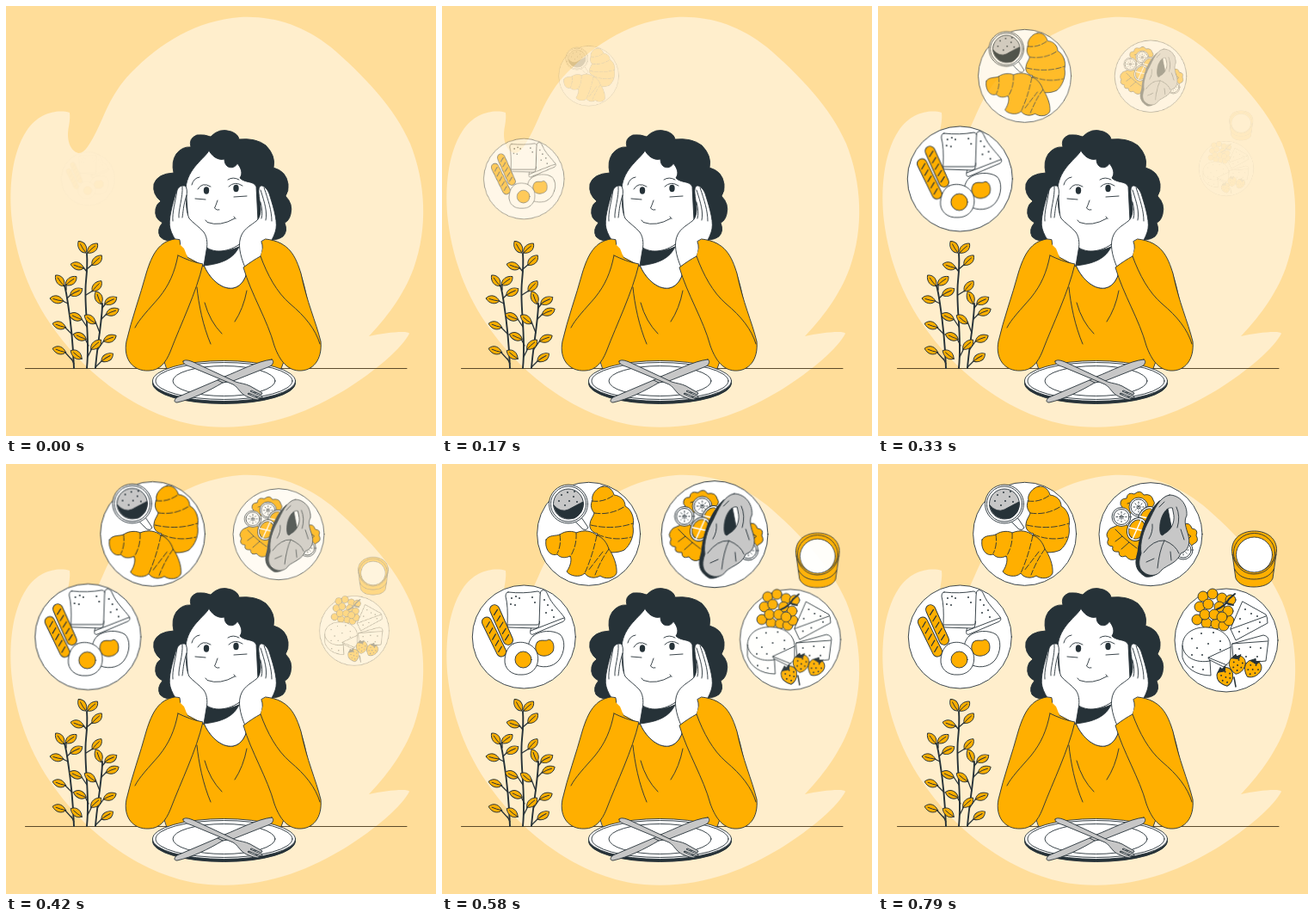
Animation of 500 by 500 pixels, one loop 0.83 s. Source, as an HTML page:

```html
<!DOCTYPE html>
<html lang="en">
<head>
<meta charset="utf-8">
<title>Thinking about food</title>
<style>
html, body { margin: 0; width: 100%; height: 100%; overflow: hidden; background: #ffdd99; }
svg { display: block; width: 100vw; height: 100vh; }
svg { stroke: #263238; stroke-width: .9; stroke-linecap: round; stroke-linejoin: round; fill: none; }
.o { fill: #ffaf00; }
.w { fill: #fff; }
.g { fill: #c7c7c7; }
.d { fill: #263238; }
.flat { stroke: none; }
.dash { stroke-dasharray: 7 2.5; }
.dot { stroke-width: 1.9; }

/* each dish pops in over 500 ms with a slight overshoot */
.dish { animation: 830ms cubic-bezier(.36, -.01, .5, 1.38) infinite; }
#breakfast { transform-origin: 95.3px 201px; animation-name: pop1; animation-timing-function: cubic-bezier(.335, .15, .499, 1.361); }
#bakery { transform-origin: 170.6px 81.3px; animation-name: pop2; }
#fish { transform-origin: 317px 81.7px; animation-name: pop3; }
#cheese { transform-origin: 405px 171px; animation-name: pop4; }
@keyframes pop1 {
  0% { opacity: .015; transform: scale(.5075); }
  56.15%, 100% { opacity: 1; transform: none; }
}
@keyframes pop2 {
  0%, 7.83% { opacity: 0; transform: scale(.5); }
  68.07%, 100% { opacity: 1; transform: scale(1); }
}
@keyframes pop3 {
  0%, 19.88% { opacity: 0; transform: scale(.5); }
  80.12%, 100% { opacity: 1; transform: scale(1); }
}
@keyframes pop4 {
  0%, 31.93% { opacity: 0; transform: scale(.5); }
  92.17%, 100% { opacity: 1; transform: scale(1); }
}
</style>
</head>
<body>
<svg viewBox="0 0 500 500">
  <defs>
    <g id="leaf">
      <path class="o" d="M-8,0C-5,-6 3,-6 8,-1C4,6 -4,5 -8,0Z"/>
      <path d="M-8,0Q-2,-1 4,-.6"/>
    </g>
    <circle id="grape" class="o" r="6"/>
    <g id="cucumber">
      <circle class="w" r="11"/>
      <circle r="9"/>
      <path stroke-dasharray="1.6 2" d="M-6,0H6M0,-6V6M-4,-4L4,4M4,-4L-4,4"/>
    </g>
    <g id="berry">
      <path class="o" d="M-1,-9C5,-12 11,-6 9,1C7,8 1,11 -3,11C-8,7 -11,1 -9,-4C-8,-8 -5,-9 -1,-9Z"/>
      <path class="dot" stroke-width="1.5" d="M-4,-3h0M2,-5h0M6,-1h0M0,1h0M-5,3h0M4,4h0M-1,7h0"/>
      <path class="d" d="M-6,-8L-1,-12L0,-9L5,-11L2,-6L-2,-7Z"/>
    </g>
    <g id="sausage">
      <rect class="o" x="-25" y="-5.6" width="50" height="11.2" rx="5.6"/>
      <path d="M-18,-3L-14,3M-10,-3L-6,3M-2,-3L2,3M6,-3L10,3M14,-3L18,3" stroke-width="1.2"/>
    </g>
  </defs>

  <path class="flat" fill="#ffeecc" d="M74,124C60,120 38,124 24,145C6,172 3,215 7,250C13,300 32,345 62,384C100,434 165,483 235,489C300,494 352,472 395,446C430,424 460,398 469,381C468,377 440,380 422,384C440,365 462,338 474,305C491,258 488,205 470,160C452,118 415,80 378,48C345,22 310,11 272,13C222,17 180,42 145,78C120,104 114,130 103,150C97,161 91,172 84,171C74,168 70,155 73,140C75,130 74,126 74,124Z"/>

  <path stroke="#4a3a1c" d="M22.500,421.500H466"/>

  <g id="plant">
    <path stroke-width="1.9" d="M79,421C78,395 75,365 72,346Q70,332 68,325M94,421C98,380 90,350 93,320Q95,300 94,288M104,421C106,395 112,365 112,346"/>
    <path stroke-width="1.3" d="M94,309L90,304M94,306L101,300M93,336L101,331M72,346L66,343M71,340L75,336M70,330L70,324M112,351L116,346M111,364L117,358M94,373L88,364M109,380L104,367M77,382L69,374M107,399L114,389M96,395L92,387M95,408L100,398M78,413L69,403M79,416L76,410M104,420L111,413"/>
  </g>

  <g id="woman">
    <path class="d" d="M238,152Q248,141 262,146Q270,149 271,155Q290,153 302,162Q314,174 311,188Q326,192 328,207Q329,215 325,221Q334,230 331,242Q329,250 324,252Q328,262 322,268Q314,274 300,271L200,271Q186,276 179,268Q175,260 182,252Q172,247 174,236Q175,230 180,227Q170,219 172,207Q176,195 195,194Q192,181 198,172Q205,163 215,164Q212,154 222,150Q231,149 238,152Z"/>
    <path class="o" d="M160,340C166,292 176,272 205,271L230,301C236,316 250,330 264,328C275,326 280,314 281,304L300,271C330,275 342,300 350,340L320,421.500H187Z"/>
    <path class="w" d="M232,280L230,301C236,316 250,330 264,328C275,326 280,314 281,304L272,278Z"/>
    <path class="d" d="M232,281C242,287 258,286 271,280C265,293 252,300 229,302Z"/>
    <path class="w" d="M236,168C232,177 211,188 209,212L212,250C218,272 233,285 247,285C263,285 280,276 293,250L291,210C288,203 277,206 272,200C276,194 273,188 269,183C266,190 254,190 254,178C246,180 239,174 236,168Z"/>

    <path d="M216,208Q218,200 225,199M258,202Q264,198 271,202M223,213Q228,204 238,210M259,210Q266,203 275,209M220,224L232,225M265,222L280,221M246,226Q244,232 242.500,235Q245,238 248,237M232,249L234,251.500Q249,257 266,247M265,245L267,247.500"/>
    <g class="d flat">
      <ellipse cx="233" cy="214.500" rx="3.200" ry="4.200"/>
      <ellipse cx="267.500" cy="212" rx="3.200" ry="4.200"/>
    </g>

    <path class="w" d="M211,292C204,282 194,270 191,259C188,249 194,230 197,219C199,212 202,209 206,209C210,208 211,214 210,221C209,232 210,240 213,247C217,252 225,257 230,263C235,270 234,280 233,284L230,302Z"/>
    <path d="M199,214C197,228 193,240 194,250M205,210C206,222 200,238 201,246M210,220C206,232 206,240 205,246"/>
    <path class="w" d="M295,294C304,280 312,270 314,259C316,248 309,228 306,218C303,211 298,207 295,210C292,214 296,228 296,236C296,243 294,248 291,250C285,255 278,258 274,266C269,276 272,290 278,304Z"/>
    <path d="M300,211C305,226 309,238 309,250M296,214C301,229 304,240 302,249M296,228Q299,240 297,247"/>

    <path class="o" d="M196,271C178,274 170,288 163,311C156,337 146,364 140,390C136,411 148,425 166,424C179,424 186,414 191,402C204,368 221,334 229,300C218,298 208,294 200,290Q204,280 202,272Z"/>
    <path d="M200,290C196,310 190,324 178,339C166,353 155,364 150,374"/>
    <path class="o" d="M302,271C330,274 337,292 343,311C350,345 360,366 366,390C368,411 357,425 340,424C325,423 317,409 312,395C304,365 285,335 276,304C284,298 290,294 296,291Q300,282 297,274Z"/>
    <path d="M296,291C304,313 315,333 330,346C348,361 360,376 365,393"/>
    <path class="flat o" d="M197,272L207,282L211,292L200,289.500ZM302,272L312,280L306,290L296,290.500Z"/>
    <path d="M222,327C224,347 229,372 238,393M231,345Q237,367 251,381M266,367Q276,352 280,331"/>
  </g>

  <g id="setting">
    <ellipse class="d" cx="253.500" cy="438.500" rx="83" ry="24"/>
    <ellipse class="w" cx="253.500" cy="436" rx="83" ry="23.500"/>
    <ellipse cx="253.500" cy="436" rx="79.500" ry="21.500"/>
    <ellipse cx="253.500" cy="436" rx="59.500" ry="17.500"/>
    <path class="g" d="M309,411C312,412 311,417 307,419L264,436L252,438C235,448 217,457 199,461C195,461 195,458 199,455L246,435L254,431C272,424 292,413 309,411Z"/>
    <path d="M246,435L252,438"/>
    <path class="g" d="M206,413C208,410 216,413 222,416L267,437C273,439 278,439 284,442L298,450L297,452L285,447L284,448L298,454L297,456L282,450L281,451L295,457L293,458C286,457 278,454 274,450C270,446 268,442 264,440L216,420C210,418 205,416 206,413Z"/>
  </g>

  <g id="breakfast" class="dish">
    <circle class="w" cx="95.300" cy="201" r="60"/>
    <path class="w" d="M115,148C118,145 121,147 123,152C127,162 137,171 142,178C144,181 142,183 139,184L106,198C103,199 102,197 103,193Z"/>
    <path d="M103,194L139,180L142,179"/>
    <path class="w" d="M77,149Q95,151 111,148Q115,148 114,154L113,187Q113,191 109,191L79,190Q75,190 76,186Q77,165 74,154Q74,149 77,149Z"/>
    <path d="M76,187H110Q114,187 113.500,183"/>
    <path class="dot" d="M81,156h0M86,154h0M80,163h0M90,156h0M85,164h0M105,155h0M108,161h0M119,158h0M123,164h0M128,170h0M121,173h0M130,178h0"/>
    <use href="#sausage" transform="translate(69,187) rotate(66)"/>
    <use href="#sausage" transform="translate(60.500,201) rotate(64)"/>
    <path class="w" d="M106,200C114,193 129,193 137,198C144,204 143,219 136,228C129,237 115,238 106,232C99,225 97,208 106,200Z"/>
    <path class="o" d="M111,207C115,203 121,207 124,204C130,205 131,213 129,218C125,224 115,225 111,220C108,216 108,210 111,207Z"/>
    <path class="w" d="M83,209C94,204 108,210 111,221C114,234 106,245 93,245C81,246 72,238 73,227C74,218 77,212 83,209Z"/>
    <circle class="o" cx="94.500" cy="227.500" r="9.500"/>
  </g>

  <g id="bakery" class="dish">
    <circle class="w" cx="170.600" cy="81.300" r="60"/>
    <path class="o" d="M187,26C194,25 199,31 200,36C208,37 213,42 213,49C221,53 224,64 222,72C224,83 219,94 212,100C204,104 190,104 181,99C177,93 178,86 181,81C175,80 171,75 172,70C172,65 176,61 177,57C172,51 173,46 175,42C173,36 180,27 187,26Z"/>
    <path class="dash" d="M174,43Q188,45 200,36M177,57Q196,60 213,49M173,71Q199,77 222,69M181,82Q200,90 220,85"/>
    <path class="o" d="M121,88C124,82 133,84 137,82C144,77 153,78 156,80C165,76 175,78 180,83C187,85 192,92 194,99C199,105 204,118 203,127C200,134 189,134 184,130C177,134 169,132 166,127C160,133 148,130 145,125C150,118 151,110 149,107C143,110 137,109 134,105C126,108 119,99 121,88Z"/>
    <path class="dash" d="M137,82Q139,94 134,104M156,80Q157,95 149,108M180,83Q175,107 166,127M194,99Q185,111 178,129M187,102L170,124"/>
    <path class="w" d="M154,66L164,76Q168,78 170,74L162,62Z"/>
    <circle class="w" cx="147" cy="46.500" r="22.500"/>
    <circle cx="147" cy="46.500" r="20.500"/>
    <circle class="g" cx="147" cy="46.500" r="17.500"/>
    <path class="d" d="M130,48Q138,57 147,53Q158,47 164,44Q165,57 154,63Q134,66 130,48Z"/>
    <path class="dot" d="M139,36h0M146,33h0M153,38h0M136,43h0M148,43h0M157,44h0M143,48h0M154,32h0"/>
  </g>

  <g id="fish" class="dish">
    <circle class="w" cx="317" cy="81.700" r="60"/>
    <path class="o" d="M282,47Q281,40 289,40Q290,32 298,35Q305,29 309,36Q318,34 320,42Q324,47 316,52L290,58ZM270,75Q263,82 268,87Q264,95 273,96Q271,103 280,102Q280,110 288,107Q293,114 301,110L306,80L285,69ZM354,70Q363,67 365,75Q373,76 370,83Q374,90 367,93L357,101L347,90Z"/>
    <path d="M276,76L284,84L276,90M284,84L292,91L283,99M292,91L301,98M290,46L299,43L308,48M357,79L364,84L358,90"/>
    <use href="#cucumber" x="283" y="61.500"/>
    <use href="#cucumber" x="303" y="50"/>
    <use href="#cucumber" x="355" y="100"/>
    <g>
      <ellipse class="w" cx="314" cy="63" rx="11" ry="14" transform="rotate(25 314 63)"/>
      <ellipse class="o" cx="314" cy="63" rx="9" ry="11.500" transform="rotate(25 314 63)"/>
      <ellipse class="w" cx="301" cy="76" rx="11" ry="14" transform="rotate(25 301 76)"/>
      <ellipse class="o" cx="301" cy="76" rx="9" ry="11.500" transform="rotate(25 301 76)"/>
      <path stroke="#fff" stroke-width="1.500" d="M296,87L306,65M292,74L310,78M309,74L319,52M305,61L323,65"/>
    </g>
    <path class="d" d="M327,43C311,58 304,82 302,103C298,115 299,124 311,131C321,133 329,124 333,118L348,109L337,52Z"/>
    <path class="g" fill-rule="evenodd" d="M339,36C350,36 360,46 359,60C356,65 357,71 360,80C364,92 361,101 352,104C348,115 337,117 330,123C325,131 315,131 309,126C302,121 303,112 306,104C304,92 309,76 315,66C321,54 327,38 339,36ZM342,51C335,49 329,61 328,70C327,80 329,86 333,81C341,77 345,68 344,60Z"/>
    <path d="M309,103Q320,88 333,89Q346,94 350,104M333,89Q327,101 325,121M347,50Q352,61 348,74M319,70Q320,79 315,87M312,114L321,110M341,112L340,102M352,76L356,88M327,50L333,44"/>
  </g>

  <g id="cheese" class="dish">
    <circle class="w" cx="405" cy="205" r="60"/>
    <g id="grapes"></g>
    <path stroke-width="2" d="M394,169Q404,165 408,157L415,151M406,162L413,164"/>
    <path class="w" d="M424,160L451,175Q453,178 453,185L416,205L410,192Z"/>
    <path d="M410,192L451,177"/>
    <path class="w" d="M412,209L448,199Q454,200 454,205L451,229L414,233Z"/>
    <path d="M412,209L453,206"/>
    <path class="dot" d="M427,169h0M434,174h0M421,180h0M441,177h0M430,191h0M420,195h0M444,184h0M420,215h0M433,213h0M445,214h0M428,224h0M441,224h0"/>
    <path class="w" d="M354,210C355,195 370,189 383,190C399,191 410,200 410,213L410,229L402,236L386,228L387,246C370,246 357,237 354,225Z"/>
    <path d="M354,211C355,225 370,232 386,229L384,225L406,234M384,225L410,213"/>
    <path class="dot" d="M365,203h0M376,197h0M390,196h0M371,214h0M384,209h0M398,206h0M365,222h0M377,222h0M398,216h0M366,236h0M378,239h0"/>
    <use href="#berry" transform="translate(418,233) rotate(-5)"/>
    <use href="#berry" transform="translate(404,247) rotate(-25)"/>
    <use href="#berry" transform="translate(436,238) rotate(20)"/>
    <path stroke-width="1.500" d="M414,248L416,259"/>
    <path class="o" d="M411.500,101C411,87 422,78 437.500,78C453,78 464,87 463.500,101L459,133C456,140 447,143 437,143C427,143 419,140 416,133Z"/>
    <path d="M412,105C415,119 425,128 437,128C450,128 460,119 463,105M414.500,122C419,131 428,134 437,134C447,134 456,131 460.500,122"/>
    <ellipse cx="437.500" cy="103" rx="24" ry="22.500"/>
    <ellipse class="w" cx="437.500" cy="105.500" rx="21" ry="20.500"/>
  </g>
</svg>
<script>
const place = (id, shape, spots) => {
  document.getElementById(id).insertAdjacentHTML('beforeend', spots.map(([x, y, turn = 0]) =>
    `<use href="#${shape}" transform="translate(${x},${y}) rotate(${turn})"/>`).join(''));
};

place('plant', 'leaf', [
  [89, 280, -120], [101, 282, -40], [83, 302, -160], [106, 296, -42], [106, 326, -45],
  [63, 319, -125], [76, 320, -35], [59, 341, -165], [82, 333, -25], [108, 339, -110],
  [122, 343, -25], [124, 356, -20], [81, 361, -155], [98, 364, -140], [62, 371, -160],
  [121, 387, -20], [86, 384, -155], [105, 394, -40], [62, 400, -160], [82, 405, -140],
  [118, 409, -30]
]);

place('grapes', 'grape', [
  [378, 154], [389, 151], [400, 156], [410, 158], [371, 181], [382, 185], [393, 186], [402, 188],
  [374, 166], [408, 182], [384, 163], [397, 166], [407, 171], [380, 175], [391, 175], [400, 178]
]);
</script>
</body>
</html>
```
